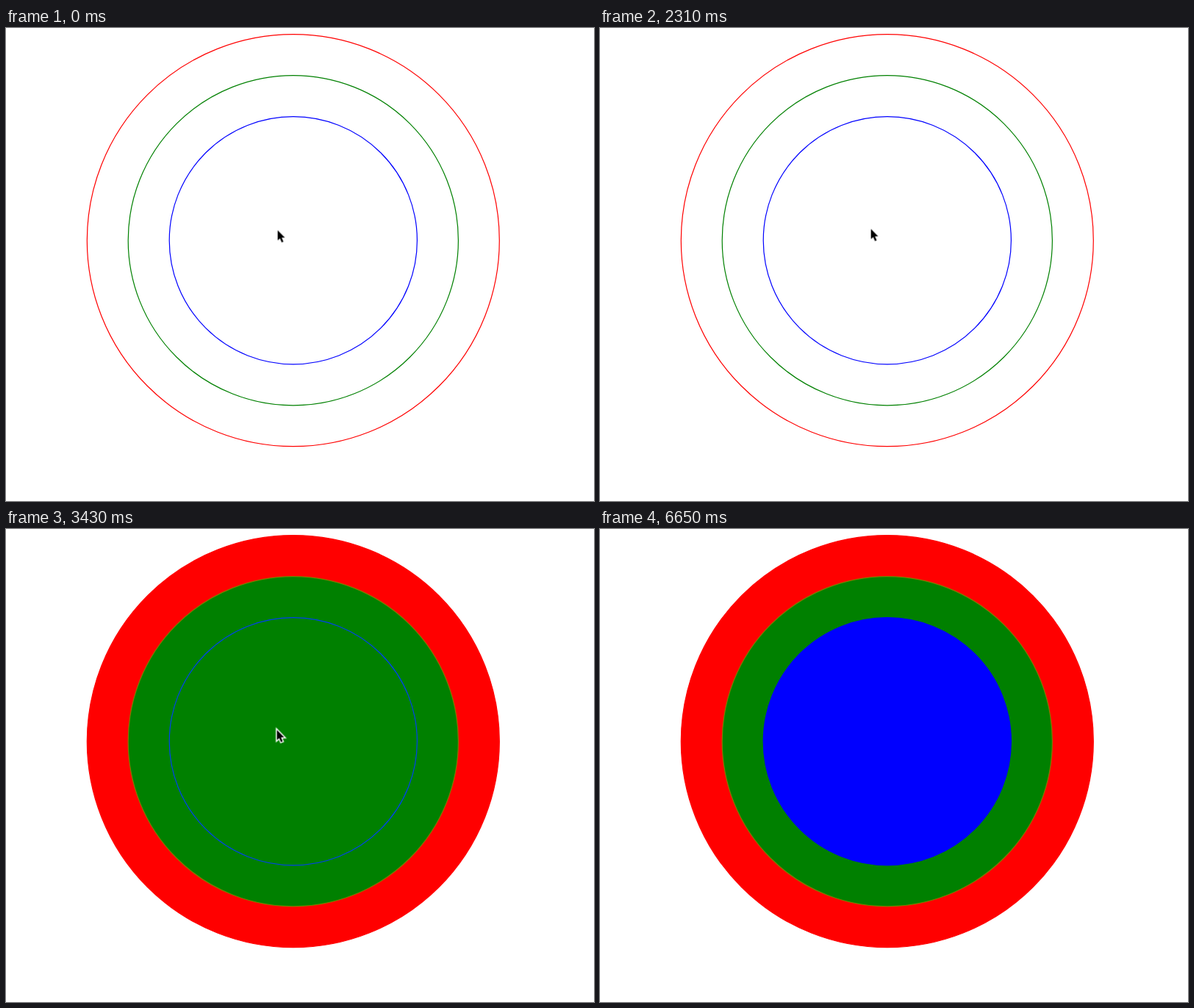
An HTML page that plays this animation: 800 by 644 pixels, repeating every 6720 ms.

```html
<!DOCTYPE html>
<html lang="en">
<head>
<meta charset="utf-8">
<title>Nested circles</title>
<style>
  html, body { margin: 0; width: 100%; height: 100%; overflow: hidden; background: #fff; }
  svg { display: block; width: 100%; height: 100%; }

  .disc { stroke: var(--c); stroke-width: 1.2; fill: none; animation: 6.72s step-end infinite; }
  .red { --c: #f00; animation-name: red; }
  .green { --c: #008000; animation-name: green; }
  .blue { --c: #00f; animation-name: blue; }

  /* After the click the discs fill from the outside in, one second apart.
     An outline blends with the colour that fills behind it. */
  @keyframes red {
    0% { fill: none; }
    35.4%, 100% { fill: var(--c); }
  }
  @keyframes green {
    0% { fill: none; stroke: var(--c); }
    35.4% { fill: none; stroke: #807c00; }
    51.02%, 100% { fill: var(--c); stroke: #807c00; }
  }
  @keyframes blue {
    0% { fill: none; stroke: var(--c); }
    35.4% { fill: none; stroke: #6a10ff; }
    51.02% { fill: none; stroke: #0040f0; }
    65.6%, 100% { fill: var(--c); stroke: var(--c); }
  }

  .ring { fill: none; stroke: #dcdcf4; opacity: 0; animation: click 6.72s step-end infinite; }
  @keyframes click {
    0% { opacity: 0; }
    21.86% { opacity: 1; }
    22.9%, 100% { opacity: 0; }
  }

  .pointer {
    stroke: #fff; stroke-width: 3; paint-order: stroke;
    animation: move 6.72s linear infinite, leave 6.72s step-end infinite;
  }
  @keyframes move {
    0% { transform: translate(369.6px, 275.4px); }
    21.8% { transform: translate(368.8px, 274.2px); }
    25% { transform: translate(368.6px, 273.6px); }
    68.7% { transform: translate(368.6px, 273.6px); animation-timing-function: ease-in; }
    71.8%, 100% { transform: translate(376px, 589px); }
  }
  @keyframes leave {
    0% { visibility: visible; }
    72.9%, 100% { visibility: hidden; }
  }
</style>
</head>
<body>
<svg viewBox="0 0 800 644">
  <circle class="disc red" cx="390.8" cy="289.2" r="280.5"/>
  <circle class="disc green" cx="390.8" cy="289.2" r="224.6"/>
  <circle class="disc blue" cx="390.8" cy="289.2" r="168.6"/>
  <circle class="ring" cx="368.4" cy="274.5" r="38.4"/>
  <path class="pointer" d="M0 0V13.8L3.1 10.9L5.5 16.4L7.8 15.4L5.5 10H9.8Z"/>
</svg>
</body>
</html>
```
